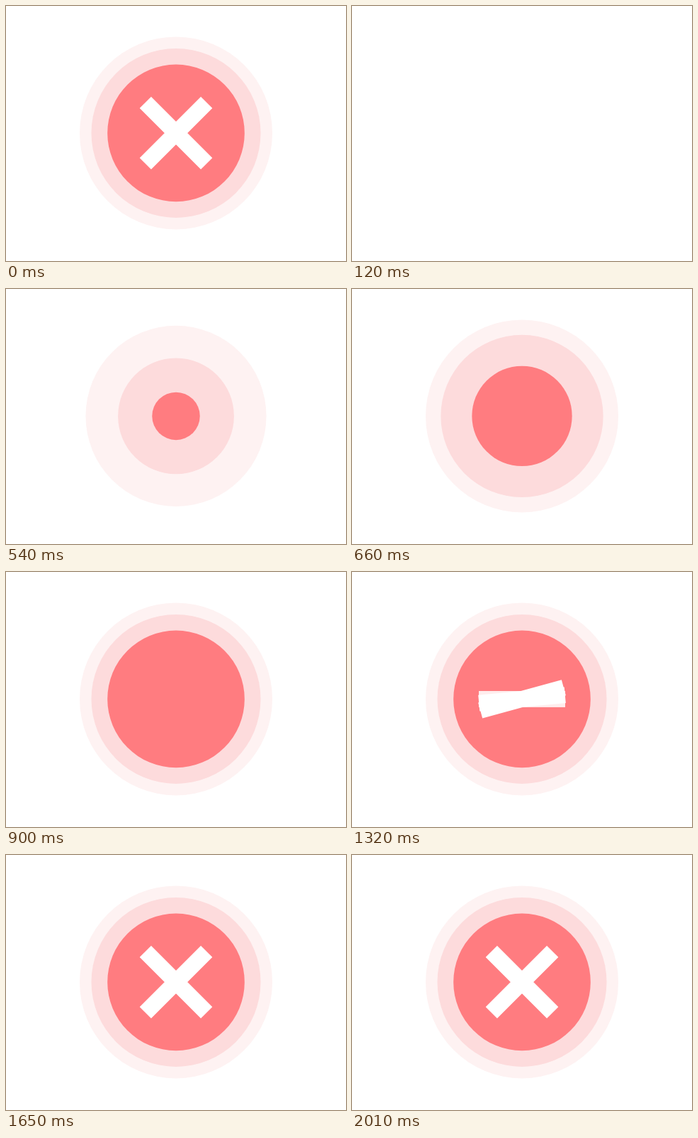
An HTML page with a canvas that plays this animation: 480x360 px, repeating every 2.25 s.

```html
<!DOCTYPE html>
<html lang="en">
<head>
<meta charset="utf-8">
<title>Error badge</title>
<style>
  html, body { margin: 0; width: 100%; height: 100%; overflow: hidden; background: #fff; }
  canvas { display: block; width: 480px; height: 360px; }
</style>
</head>
<body>
<canvas id="stage" width="480" height="360"></canvas>
<script>
const ctx = document.getElementById('stage').getContext('2d');
const LOOP = 2250, STEP = 30, START = 120;
const CX = 240, CY = 179.4;
const BAR = { length: 122, width: 22.8 };

const rings = [
  { radius: 136, color: '#fef2f2', start: 137 },
  { radius: 119.5, color: '#fddbdc', start: 242 },
  { radius: 96.8, color: '#ff7c80', start: 347 }
];
const GROW = 480;

const arms = [
  { angle: -45, start: 1310, end: 1395 },
  { angle: -135, start: 1298, end: 1492 }
];

// Fading trail behind the turning bars, oldest first
const trail = [
  { lag: 80, alpha: 0.12 },
  { lag: 52, alpha: 0.58 },
  { lag: 0, alpha: 1 }
];

const progress = (t, start, end) => Math.min(1, Math.max(0, (t - start) / (end - start)));
const ease = u => (1 - Math.cos(Math.PI * u)) / 2;

function drawRing({ radius, color, start }, t) {
  const r = radius * ease(progress(t, start, start + GROW));
  if (r < 0.3) return;
  ctx.fillStyle = radius < 100 && r < 3 ? '#8a8082' : color;
  ctx.beginPath();
  ctx.arc(CX, CY, r, 0, Math.PI * 2);
  ctx.fill();
}

function drawArm({ angle, start, end }, t) {
  const length = BAR.length * ease(progress(t, 920, 1260));
  if (!length) return;
  ctx.save();
  ctx.translate(CX, CY);
  ctx.rotate(angle * progress(t, start, end) * Math.PI / 180);
  ctx.fillRect(-length / 2, -BAR.width / 2, length, BAR.width);
  ctx.restore();
}

function draw(t) {
  ctx.fillStyle = '#fff';
  ctx.fillRect(0, 0, 480, 360);
  rings.forEach(ring => drawRing(ring, t));
  ctx.fillStyle = '#fff';
  for (const { lag, alpha } of trail) {
    ctx.globalAlpha = alpha;
    arms.forEach(arm => drawArm(arm, t - lag));
  }
  ctx.globalAlpha = 1;
}

const origin = performance.now();

function tick() {
  const t = Math.floor((performance.now() - origin) % LOOP / STEP) * STEP;
  draw(t < START ? LOOP : t);
  requestAnimationFrame(tick);
}
tick();
</script>
</body>
</html>
```
